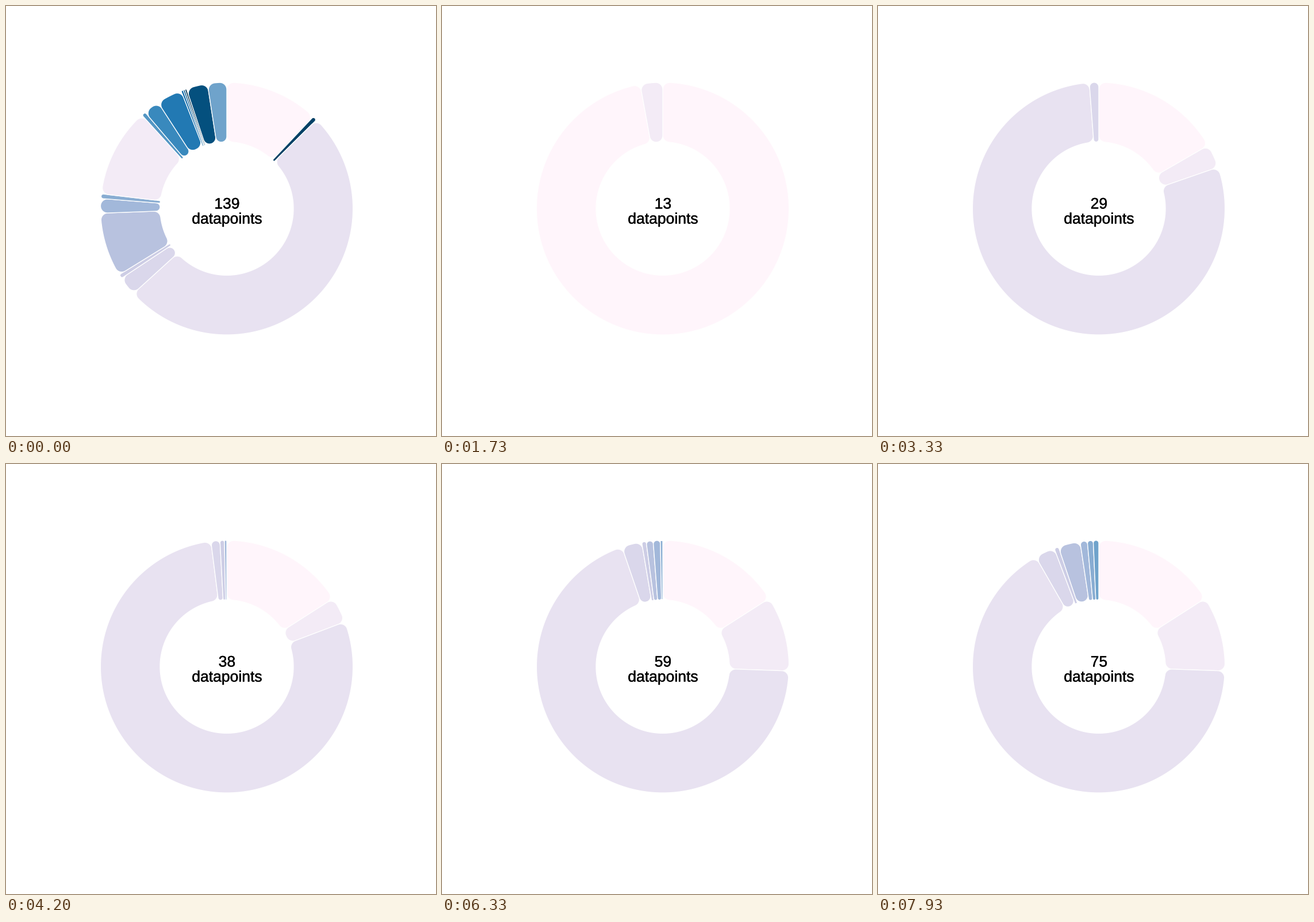
A matplotlib script for the animation above (8 s loop, 748 by 748 pixels).

```python
import numpy as np
import matplotlib.pyplot as plt
from matplotlib.animation import FuncAnimation
from matplotlib.colors import LinearSegmentedColormap
from matplotlib.patches import Polygon
from matplotlib.patheffects import withStroke

SIZE, DPI = 748, 100
FRAMES, INTERVAL = 400, 20
STEP = 1000 / 15    # the chart itself moves at 15 steps a second
RESET = 5           # step at which the data set starts over

CX, CY = 384, 352.4
R_OUT, R_IN, CORNER = 219.6, 116.0, 12.0
STROKE = 1.3

CATEGORIES = 17
SCALE = LinearSegmentedColormap.from_list("blues", [
    "#fff5fb", "#e8e2f1", "#cdcde5", "#a3b8da", "#70a3cb",
    "#3a8abd", "#0c69a9", "#04517f", "#033350"])

# Full data set, clockwise from the top: (category, size)
FULL = [(0, 43.3), (15, 2), (2, 182.4), (3, 8.8), (4, 1.9), (5, 29.5),
        (6, 6.7), (7, 2.1), (1, 41.1), (9, 1.9), (10, 7.4), (11, 11.7),
        (12, 1), (13, 0.8), (16, 0.8), (14, 9.8), (8, 8.8)]

# Growing data set: (category, start ms, end ms, gain)
FIRST = 57.4
GAINS = [(1, 1333, 2900, 10.4), (1, 3900, 5900, 24.2),
         (3, 2900, 3300, 4.1), (3, 4200, 6000, 5.1),
         (4, 3700, 4200, 2.05), (5, 5200, 8300, 10.5),
         (6, 3900, 4700, 3.3), (7, 5900, 6900, 2.7),
         (8, 6600, 8100, 2.6)]


def progress(t, start, end):
    return min(1, max(0, (t - start) / (end - start)))


def smooth(u):
    return u * u * (3 - 2 * u)


def growing(t):
    sizes = np.zeros(9)
    sizes[0] = FIRST
    for k, start, end, gain in GAINS:
        sizes[k] += gain * smooth(progress(t, start, end))
    # the dominant category eases out into whatever the others leave free
    sizes[2] = (360 - sizes.sum()) * (1 - (1 - progress(t, 1800, 3800)) ** 2)
    return range(9), sizes


def state(step):
    """Categories, sizes and counter value."""
    ticks = step * 2 // 3
    if step < RESET:
        order, sizes = zip(*FULL)
        return order, np.array(sizes), 139 + ticks
    return *growing(step * STEP), max(0, ticks - 4)


def polar(r, a):
    """Points at radius r and clockwise angle a from the top."""
    return np.column_stack([r * np.sin(a), -r * np.cos(a)])


def arc(r, a, b):
    return polar(r, np.linspace(a, b, max(4, int(abs(b - a) * 90))))


def corner(edge, side, r, rc, outer):
    """Rounded corner, listed from the straight edge towards the ring arc."""
    mid = r - rc if outer else r + rc
    a = edge + side * np.arcsin(min(1, rc / mid))
    start = edge - side * np.pi / 2
    end = a if outer else a - side * np.pi
    return polar(mid, np.array([a])) + polar(rc, np.linspace(start, end, 12)), a


def is_ring(a, b):
    return b - a > 2 * np.pi - 1e-4


def outline(a, b):
    if is_ring(a, b):
        half = STROKE / 2
        return np.vstack([arc(R_OUT - half, a, b), arc(R_IN + half, b, a)])
    rc_out = rc_in = CORNER
    if b - a < np.pi:
        k = 1 / np.sin((b - a) / 2)
        rc_out = min(rc_out, R_OUT / (k + 1))
        rc_in = min(rc_in, R_IN / (k - 1))
    o1, oa = corner(a, 1, R_OUT, rc_out, True)
    o2, ob = corner(b, -1, R_OUT, rc_out, True)
    i1, ia = corner(a, 1, R_IN, rc_in, False)
    i2, ib = corner(b, -1, R_IN, rc_in, False)
    return np.vstack([o1, arc(R_OUT, oa, ob), o2[::-1],
                      i2, arc(R_IN, ib, ia), i1[::-1]])


plt.rcParams["text.hinting"] = "none"
fig = plt.figure(figsize=(SIZE / DPI, SIZE / DPI), dpi=DPI, facecolor="white")
ax = fig.add_axes([0, 0, 1, 1])
ax.set_xlim(0, SIZE)
ax.set_ylim(SIZE, 0)
ax.axis("off")

wedges = [ax.add_patch(Polygon([(0, 0), (1, 0), (0, 1)], closed=True,
                               edgecolor="white", joinstyle="round"))
          for _ in range(CATEGORIES)]
label = dict(ha="center", va="baseline", color="black", zorder=5,
             family="Liberation Sans", fontsize=26.5 * 72 / DPI,
             path_effects=[withStroke(linewidth=0.3, foreground="black")])
counter = ax.text(CX + 0.4, 352.4, "", **label)
caption = ax.text(CX + 0.4, 378.5, "datapoints", **label)


def draw(frame):
    step = int((frame + 1) * INTERVAL / STEP + 1e-6)
    order, sizes, count = state(step)
    edges = np.append(0, np.cumsum(sizes)) * 2 * np.pi / sizes.sum()
    for wedge in wedges:
        wedge.set_visible(False)
    for wedge, k, a, b in zip(wedges, order, edges, edges[1:]):
        if b - a < 0.004:
            continue
        wedge.set_visible(True)
        wedge.set_xy(outline(a, b) + (CX, CY))
        wedge.set_facecolor(SCALE(k / (CATEGORIES - 1)))
        wedge.set_linewidth(0 if is_ring(a, b) else STROKE * 72 / DPI)
    counter.set_text(str(count))
    return [*wedges, counter, caption]


anim = FuncAnimation(fig, draw, frames=FRAMES, interval=INTERVAL,
                     repeat=True, repeat_delay=0, blit=False)
plt.show()
```
